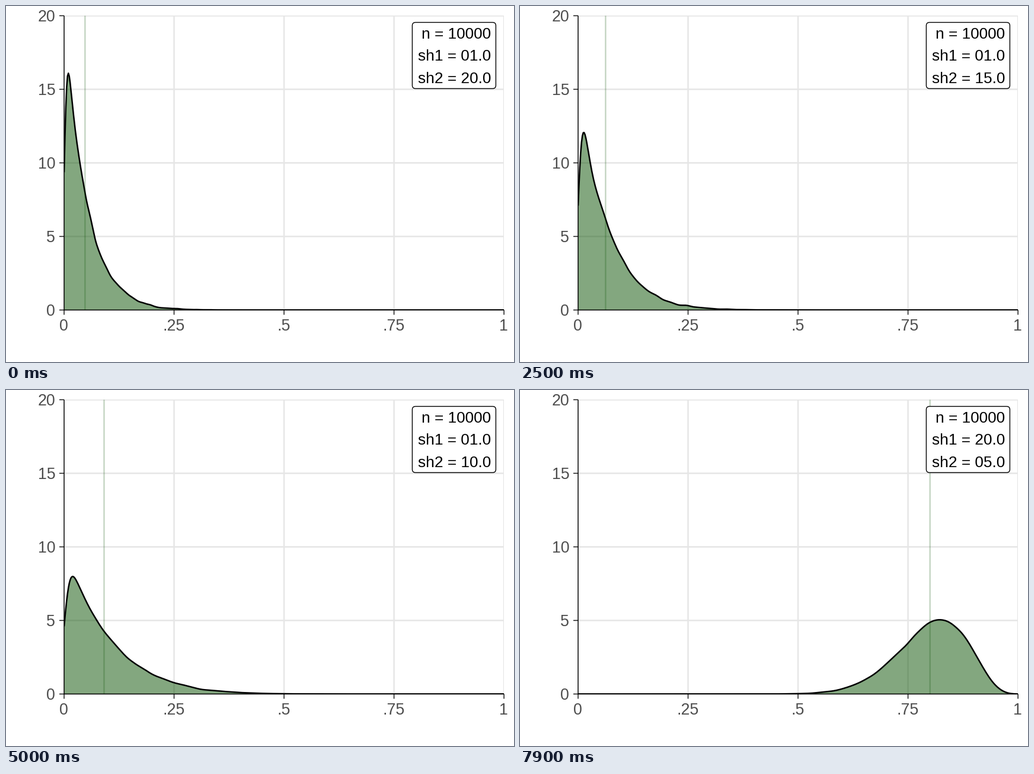
A matplotlib script for the animation above (8000 ms loop, 857x600 px).

```python
import matplotlib.pyplot as plt
import numpy as np
from matplotlib.animation import FuncAnimation
from matplotlib.patches import FancyBboxPatch, Polygon, Rectangle

plt.rcParams["font.family"] = "Liberation Sans"
plt.rcParams["path.snap"] = False

W, H, DPI = 857, 600, 100
PX = 72 / DPI  # one pixel in points
LEFT, RIGHT, TOP, BOTTOM = 98, 840.1, 16.4, 512.4
GREEN = (8 / 255, 80 / 255, 0)
FRAMES, INTERVAL = 80, 100

N = 10000
DRAWS = 3 * N  # extra draws keep the wobble moderate
SHAPE1 = (1, 5, 10, 15, 20)
EDGES = np.linspace(-0.2, 1.2, 2801)
STEP = EDGES[1] - EDGES[0]
MID = (EDGES[:-1] + EDGES[1:]) / 2
XS = np.linspace(0, 1, 512)


def px(x):
    return LEFT + (RIGHT - LEFT) * x


def py(y):
    return BOTTOM - (BOTTOM - TOP) * y / 20


def density(a, b, seed):
    """Gaussian kernel density of beta draws, evaluated on XS."""
    draws = np.random.default_rng(seed).beta(a, b, DRAWS)
    q1, q3 = np.percentile(draws, [25, 75])
    bw = 0.9 * min(draws.std(), (q3 - q1) / 1.34) * N ** -0.2
    hist = np.histogram(draws, EDGES)[0] / (DRAWS * STEP)
    t = np.arange(-200, 201) * STEP
    kernel = np.exp(-0.5 * (t / bw) ** 2)
    return np.interp(XS, MID, np.convolve(hist, kernel / kernel.sum(), "same"))


fig = plt.figure(figsize=(W / DPI, H / DPI), dpi=DPI, facecolor="white")
ax = fig.add_axes([0, 0, 1, 1])
ax.set_xlim(0, W)
ax.set_ylim(H, 0)
ax.axis("off")
panel = Rectangle((LEFT, TOP), RIGHT - LEFT, BOTTOM - TOP,
                  transform=ax.transData)


def line(xs, ys, color, width, z, clip=False, **kw):
    art, = ax.plot(xs, ys, color=color, lw=width * PX, zorder=z,
                   solid_capstyle="butt", **kw)
    if clip:
        art.set_clip_path(panel)
    return art


def text(x, y, s, size, color, ha):
    return ax.text(x, y, s, fontsize=size * PX, color=color, ha=ha,
                   va="baseline", zorder=9)


for i, name in enumerate(("0", ".25", ".5", ".75", "1")):
    x, y = px(i / 4), py(i * 5)
    if i:
        line([x, x], [TOP, BOTTOM], "#e6e6e6", 2.5, 1, True)
        line([LEFT, RIGHT], [y, y], "#e6e6e6", 2.5, 1, True)
    line([x, x], [BOTTOM, BOTTOM + 8], "#1a1a1a", 1.5, 6)
    line([LEFT - 8, LEFT], [y, y], "#1a1a1a", 1.5, 6)
    text(x - 0.3, 547, name, 26.7, "#4d4d4d", "center")
    text(83.2, y + 9.3, str(i * 5), 26.7, "#4d4d4d", "right")

line([LEFT, LEFT], [TOP, BOTTOM + 0.7], "black", 1.5, 6)
line([LEFT, RIGHT], [BOTTOM, BOTTOM], "black", 1.5, 6)

area = Polygon([(0, 0), (1, 0), (1, 1)], closed=True, facecolor=GREEN,
               alpha=0.5, lw=0, zorder=2)
ax.add_patch(area)
area.set_clip_path(panel)
curve = line([], [], "black", 2.5, 3, True, solid_joinstyle="round")
mean = line([], [], GREEN, 2.3, 4, True, alpha=0.25)

ax.add_patch(FancyBboxPatch((685.4, 27.6), 141, 111.6,
                            boxstyle="round,pad=0,rounding_size=5.5",
                            facecolor="white", edgecolor="black",
                            lw=1.4 * PX, zorder=8))
text(818.6, 55, f"n = {N}", 26.2, "black", "right")
label1 = text(818.6, 92.5, "", 26.2, "black", "right")
label2 = text(818.6, 130, "", 26.2, "black", "right")


def update(k):
    a, b = SHAPE1[k % 5], 20 - k // 5
    xs, ys = px(XS), py(density(a, b, k))
    curve.set_data(xs, ys)
    area.set_xy(np.vstack([(LEFT, BOTTOM), np.column_stack([xs, ys]),
                           (RIGHT, BOTTOM)]))
    m = px(a / (a + b))
    mean.set_data([m, m], [TOP, BOTTOM])
    label1.set_text(f"sh1 = {a:04.1f}")
    label2.set_text(f"sh2 = {b:04.1f}")
    return area, curve, mean, label1, label2


anim = FuncAnimation(fig, update, frames=FRAMES, interval=INTERVAL,
                     repeat=True, repeat_delay=0, blit=False)
plt.show()
```
